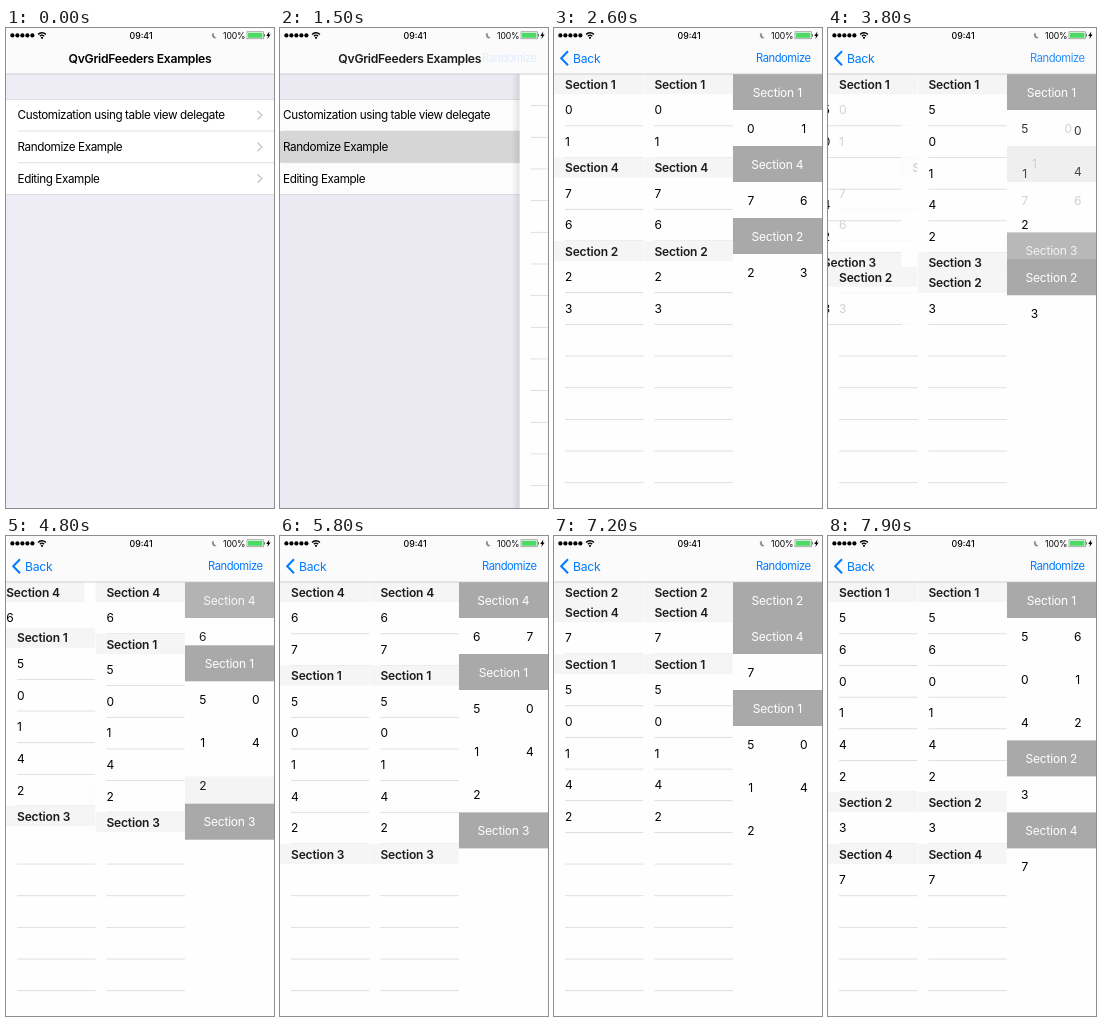
Write an HTML page with a canvas that moves like this. It is 268 by 480 pixels and loops after 8 s.

```html
<!DOCTYPE html>
<html lang="en">
<head>
<meta charset="utf-8">
<title>List examples</title>
<style>
  html, body { margin: 0; width: 100%; height: 100%; overflow: hidden; background: #fff; }
  canvas { display: block; width: 268px; height: 480px; }
</style>
</head>
<body>
<canvas id="stage"></canvas>
<script>
const W = 268, H = 480, LOOP = 8000, STEP = 100;
const TOP = 46, HEAD = 20.15, ROW = 31.66, COL = 89.4;
const CELL = 36, PITCH = 43.2;
const BLUE = '#007aff', LINE = '#d8d8de';

const canvas = document.getElementById('stage');
const ctx = canvas.getContext('2d');
const dpr = window.devicePixelRatio || 1;
canvas.width = W * dpr;
canvas.height = H * dpr;

// Each state lists its sections as "id:items"; soft ones reload their rows.
const states = [
  { at: 2600, dur: 0, data: '1:01 4:76 2:23' },
  { at: 3440, dur: 500, data: '1:50142 3: 2:3', soft: true },
  { at: 4560, dur: 310, data: '4:6 1:50142 3:' },
  { at: 5460, dur: 310, data: '4:67 1:50142 3:' },
  { at: 6260, dur: 460, data: '1:50142 2: 3:', soft: true },
  { at: 6600, dur: 300, data: '2: 4:7 1:50142' },
  { at: 7560, dur: 310, data: '1:560142 2:3 4:7' }
];
const taps = [3400, 6200];

const clamp = v => Math.max(0, Math.min(1, v));
const lerp = (a, b, p) => a + (b - a) * p;
const ease = u => (1 - Math.cos(Math.PI * clamp(u))) / 2;
const sections = s => s.data.split(' ').map(part => part.split(':'));

function rect(x, y, w, h, color) {
  ctx.fillStyle = color;
  ctx.fillRect(x, y, w, h);
}

function text(str, x, y, { size = 12, weight = 400, color = '#000', align = 'left', track = -0.2 } = {}) {
  ctx.font = `${weight} ${size}px Inter, Roboto, sans-serif`;
  ctx.letterSpacing = track + 'px';
  ctx.textAlign = align;
  ctx.fillStyle = color;
  ctx.fillText(str, x, y + size * 0.364);
}

function path(points, color, width) {
  ctx.beginPath();
  points.forEach(([x, y]) => ctx.lineTo(x, y));
  ctx.strokeStyle = color;
  ctx.lineWidth = width;
  ctx.stroke();
}

function dot(x, y, r, color) {
  ctx.beginPath();
  ctx.arc(x, y, r, 0, 7);
  ctx.fillStyle = color;
  ctx.fill();
}

function group(alpha, draw) {
  ctx.save();
  ctx.globalAlpha *= clamp(alpha);
  draw();
  ctx.restore();
}

const hairline = (x, y, w, color = LINE) => rect(x, y - 0.4, w, 0.8, color);

// Layouts

function tableLayout(state) {
  const out = [];
  let y = TOP, n = 0;
  for (const [sec, items] of sections(state)) {
    out.push({ key: 's' + sec, sec, head: true, x: 0, y, a: 1 });
    y += HEAD;
    for (const item of items) {
      out.push({ key: item, sec, x: 0, y, a: 1, n: n++ });
      y += ROW;
    }
  }
  out.bottom = y;
  return out;
}

function gridLayout(state) {
  const out = [];
  let y = TOP;
  for (const [sec, items] of sections(state)) {
    out.push({ key: 's' + sec, sec, head: true, x: 0, y, a: 1 });
    y += CELL;
    [...items].forEach((item, i) => out.push({
      key: item, sec, x: i % 2 * 53, y: y + Math.floor(i / 2) * PITCH, a: 1
    }));
    if (items) y += Math.ceil(items.length / 2) * PITCH - (PITCH - CELL);
  }
  return out;
}

const mix = (a, b, p) => ({ ...b, x: lerp(a.x, b.x, p), y: lerp(a.y, b.y, p), a: lerp(a.a, b.a, p) });

function pose(i, t, layout) {
  const { at, dur, soft } = states[i];
  const to = layout(states[i]);
  if (!i || t >= at + dur) return to;

  const grid = layout === gridLayout;
  const p = ease((t - at) / dur), rest = 1 - p;
  const old = new Map(pose(i - 1, at, layout).filter(e => !e.ghost).map(e => [e.key, e]));
  const ghosts = [], live = [];

  for (const b of to) {
    const a = old.get(b.key);
    const reload = soft && !b.head && (!grid || (a && a.sec === b.sec && b.sec === '1'));
    if (a && !reload) live.push(mix(a, b, p));
    else if (grid) live.push({ ...b, y: b.y + (reload ? 12 * rest : 0), a: p });
    else if (b.head || !old.has('s' + b.sec)) live.push({ ...b, x: -COL * rest });
    else live.push({ ...b, y: b.y + (soft ? 18 * b.n * rest : 0), a: p });
    if (a && reload) ghosts.push({ ...(grid ? mix(a, b, p) : a), a: rest, ghost: true });
    old.delete(b.key);
  }
  for (const a of old.values()) {
    ghosts.push({ ...a, x: a.x + (a.head && !grid ? COL * p : 0), a: a.a * rest, ghost: true });
  }
  return ghosts.concat(live);
}

// Columns

function column(x, entries, draw) {
  ctx.save();
  ctx.beginPath();
  ctx.rect(x, TOP, COL, H - TOP);
  ctx.clip();
  ctx.translate(x, 0);
  for (const heads of [false, true]) {
    entries.filter(e => !!e.head === heads).forEach(e => group(e.a, () => draw(e)));
  }
  ctx.restore();
}

function fillers(x, bottom) {
  for (let y = bottom + ROW; y < H; y += ROW) hairline(x + 11, y, 78.5);
}

function tableCell(e) {
  if (e.head) {
    rect(e.x, e.y, COL, HEAD, '#f5f5f6');
    text('Section ' + e.sec, e.x + 11, e.y + 10.5, { weight: 600, color: '#1c1c1e', track: -0.15 });
  } else {
    text(e.key, e.x + 11, e.y + ROW / 2);
    hairline(e.x + 11, e.y + ROW, 78.5);
  }
}

function gridCell(e) {
  if (e.head) {
    rect(e.x, e.y, 90, CELL, '#a9a9aa');
    text('Section ' + e.sec, 44.5, e.y + 18.2, { color: '#fff', align: 'center' });
  } else {
    text(e.key, e.x + 18, e.y + 18.2, { align: 'center', track: 0 });
  }
}

function randomizePage(t) {
  let i = states.length - 1;
  while (i >= 0 && states[i].at > t) i--;
  if (i < 0) {
    [0, COL].forEach(x => fillers(x, TOP));
    return;
  }
  const now = tableLayout(states[i]);
  [0, COL].forEach(x => fillers(x, now.bottom));
  column(0, pose(i, t, tableLayout), tableCell);
  column(COL, now, tableCell);
  column(178.8, pose(i, t, gridLayout), gridCell);
}

function menuPage(selected) {
  const top = 71.4;
  rect(0, TOP, W, H - TOP, '#eeedf5');
  rect(0, top, W, ROW * 3, '#fff');
  if (selected) rect(0, top + ROW, W, ROW, '#d9d9d9');
  ['Customization using table view delegate', 'Randomize Example', 'Editing Example'].forEach((label, i) => {
    const y = top + ROW * (i + 0.5);
    text(label, 11.5, y - 0.3, { size: 11.7, track: -0.4 });
    path([[251.5, y - 4.3], [255.8, y], [251.5, y + 4.3]], '#c7c7cc', 1.4);
    if (i) hairline(11.5, top + ROW * i, W);
  });
  [top, top + ROW * 3].forEach(y => hairline(0, y, W));
}

// Bars

function statusBar() {
  for (let i = 0; i < 5; i++) dot(6.4 + i * 5, 7.4, 2.1, '#000');
  [2.9, 5.4].forEach(r => {
    ctx.beginPath();
    ctx.arc(36, 10.2, r, -Math.PI * 0.76, -Math.PI * 0.24);
    ctx.strokeStyle = '#000';
    ctx.lineWidth = 1.4;
    ctx.stroke();
  });
  dot(36, 9.8, 1.1, '#000');
  text('09:41', 135, 7.4, { size: 8.8, weight: 500, align: 'center', track: 0 });

  ctx.beginPath();
  ctx.arc(209, 7.2, 3.1, -2, 1, true);
  ctx.quadraticCurveTo(207.4, 8.6, 207.7, 4.4);
  ctx.fillStyle = '#8e8e93';
  ctx.fill();

  text('100%', 217, 7.4, { size: 8.6, track: -0.1 });
  ctx.lineWidth = 0.6;
  ctx.strokeStyle = '#777';
  ctx.strokeRect(241, 3.8, 16.4, 7);
  rect(242, 4.8, 14.4, 5, '#4cd964');
  rect(258, 6, 1, 2.6, '#777');
  ctx.beginPath();
  [[263.4, 3.6], [260.2, 7.9], [262, 7.9], [261.4, 11], [264.6, 6.6], [262.8, 6.6]]
    .forEach(([x, y]) => ctx.lineTo(x, y));
  ctx.fillStyle = '#000';
  ctx.fill();
}

function navBar(t, q) {
  rect(0, 0, W, TOP, '#fbfbfc');
  hairline(0, TOP, W, '#c4c4c8');
  statusBar();
  group(1 - q, () => text('QvGridFeeders Examples', 134 - 40 * q, 30.2,
    { size: 12.2, weight: 600, align: 'center', track: -0.28 }));
  group((q - 0.7) / 0.3, () => path([[14, 23.2], [7.2, 30.2], [14, 37.2]], BLUE, 2));
  group((q - 0.8) / 0.2, () => text('Back', 19, 30.2, { size: 12.2, color: BLUE, track: -0.28 }));

  const tap = taps.find(at => t >= at && t < at + 500);
  const press = tap === undefined ? 1 : 0.3 + 0.7 * (t - tap) / 500;
  group(q * press, () => text('Randomize', 202, 30.4, { size: 11.2, color: BLUE, track: -0.45 }));
}

function pushProgress(t) {
  if (t < 1500) return 0;
  if (t > 2100) return 1;
  const u = (t - 1450) / 91;
  return 1 - (1 + u) * Math.exp(-u);
}

function render(t) {
  const q = pushProgress(t);
  const edge = W * (1 - q);
  ctx.setTransform(dpr, 0, 0, dpr, 0, 0);
  rect(0, 0, W, H, '#fff');

  if (q < 1) {
    ctx.save();
    ctx.translate(-80 * q, 0);
    menuPage(q > 0);
    ctx.restore();
    if (q > 0) {
      rect(0, TOP, W, H, `rgba(0,0,0,${0.1 * q})`);
      const shade = ctx.createLinearGradient(edge - 8, 0, edge, 0);
      shade.addColorStop(0, 'rgba(0,0,0,0)');
      shade.addColorStop(1, 'rgba(0,0,0,.1)');
      rect(edge - 8, TOP, 8, H, shade);
    }
  }
  if (q > 0) {
    ctx.save();
    ctx.translate(edge, 0);
    rect(0, TOP, W, H, '#fefefe');
    randomizePage(t);
    ctx.restore();
  }
  navBar(t, q);
}

const start = performance.now();
function tick() {
  const t = (performance.now() - start) % LOOP;
  render(Math.floor(t / STEP) * STEP);
  requestAnimationFrame(tick);
}
tick();
</script>
</body>
</html>
```
